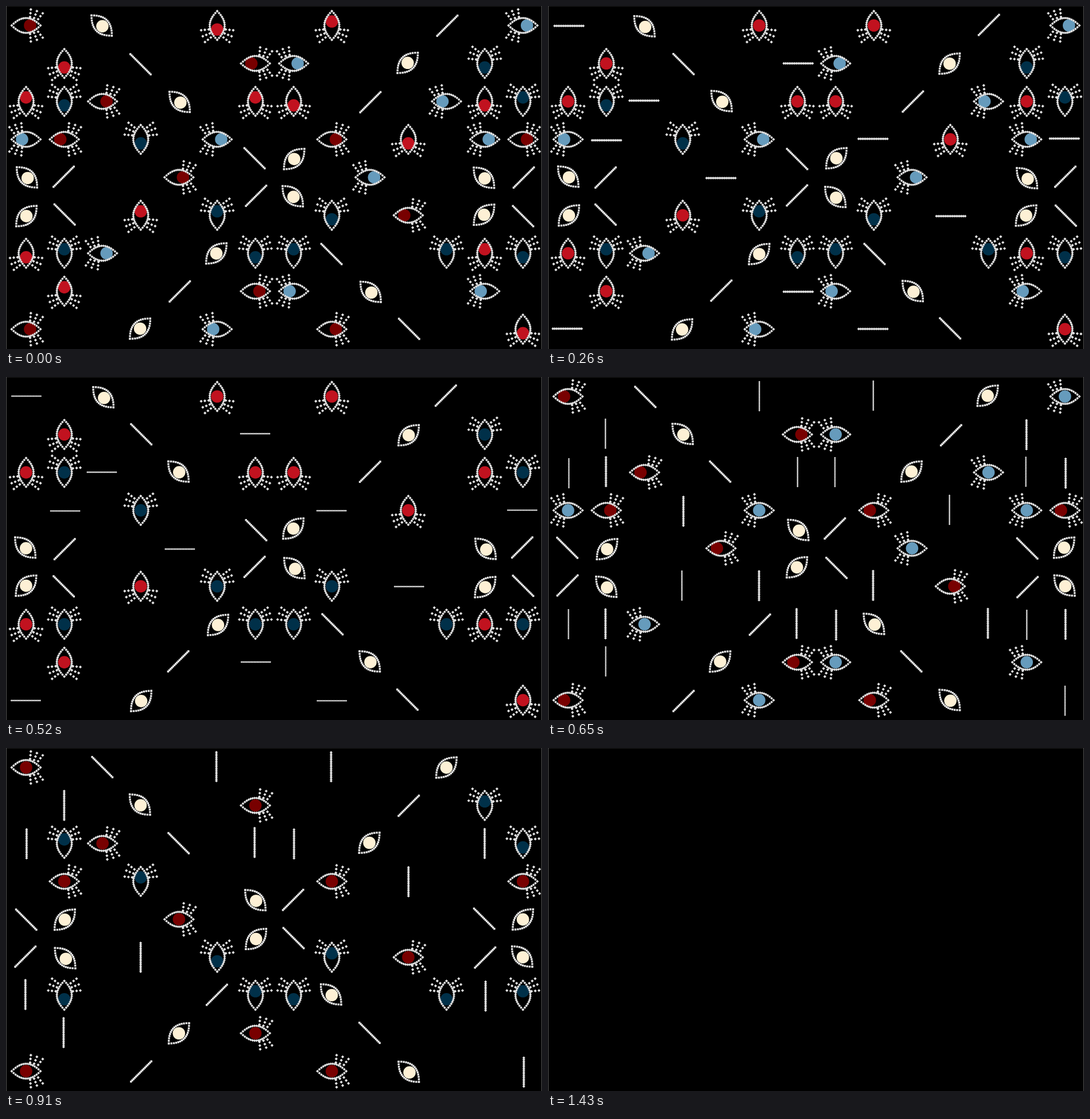
Recreate the animation shown at these times as an HTML page with a canvas. Size 934 by 599 pixels, loop 1560 ms.

```html
<!DOCTYPE html>
<html lang="en">
<head>
<meta charset="utf-8">
<title>Blinking eyes</title>
<style>
html, body { margin: 0; width: 100%; height: 100%; overflow: hidden; background: #000; }
canvas { display: block; }
</style>
</head>
<body>
<canvas id="stage" width="934" height="599"></canvas>
<script>
const ctx = document.getElementById('stage').getContext('2d');
const STEP = 130, STEPS = 12;
const HALF = 25, BULGE = 13, LOOK = 7;
const WHITE = '#e4e4e4', CREAM = '#fdf0d5';
const TURN = Math.PI / 4;

// One letter per eye; lower case m, l, r, n first look left or up
const layout = [
  'M.a..R..r..c.L',
  '.R.d..mL..b.N.',
  'rNM.a.rR.c.lRn',
  'lm.N.LdbM.R.LM',
  'ac..M....L..ac',
  'bd.r.ncaN.m.bd',
  'RnL..bNnd..nrN',
  '.r..c.Ml.a..l.',
  'M..b.l..M.d..R'
];

// Blink per step: o open, = shut, - shut and thin, . hidden
const EARLY = 'ooooo=====..', LATE = '=====oooooo.';
const kinds = {
  M: { color: '#780000', turn: 0, lash: true, blink: 'oo==-oooo...', gaze: f => f < 2 ? 1 : Math.min(0, (f - 7) / 2) },
  L: { color: '#669bbc', turn: 4, lash: true, blink: 'oooo.oo.....', gaze: f => f < 4 ? 1 : 0 },
  R: { color: '#c1121f', turn: 2, lash: true, blink: 'ooooo--==...', gaze: f => Math.max(0, 1 - f / 2) },
  N: { color: '#003049', turn: -2, lash: true, blink: 'ooooo==oo=..', gaze: f => Math.sign(4 - f) },
  A: { color: CREAM, turn: 1, blink: EARLY, gaze: () => 0.25 },
  B: { color: CREAM, turn: -1, blink: EARLY, gaze: () => 0 },
  C: { color: CREAM, turn: -1, blink: LATE, gaze: () => 0 },
  D: { color: CREAM, turn: 1, blink: LATE, gaze: () => 0.25 }
};

function makeEye(letter, col, row) {
  const name = letter.toUpperCase();
  // The middle pair of columns closes up towards the centre
  const squeeze = (col === 6 || col === 7) && Math.abs(row - 4) === 1 ? 0.5 : 1;
  return {
    kind: kinds[name],
    sign: kinds[name].lash && letter !== name ? -1 : 1,
    x: 35 + 66.6 * col,
    y: 34 + 66.3 * (4 + (row - 4) * squeeze),
    phase: col * 2.4 + row * 5.1
  };
}

const eyes = layout.flatMap((cells, row) =>
  [...cells].flatMap((letter, col) => letter === '.' ? [] : [makeEye(letter, col, row)]));

function bead(x, y, r = 2.4) {
  ctx.beginPath();
  ctx.moveTo(x - r, y);
  ctx.lineTo(x, y - r);
  ctx.lineTo(x + r, y);
  ctx.lineTo(x, y + r);
  ctx.fill();
}

function drawLine(thin) {
  const gap = thin ? 2.5 : 3.125;
  for (let x = -HALF; x <= HALF; x += gap) bead(x, 0, thin ? 1.7 : 2.5);
}

function drawOutline() {
  const n = 15;
  for (let i = 0; i <= n; i++) {
    const u = 2 * i / n - 1, h = BULGE * (1 - u * u);
    bead(u * HALF, -h);
    bead(u * HALF, h);
  }
}

// Three lashes fan out on each side of one end
function drawLashes() {
  for (const side of [-1, 1]) {
    for (let i = 0; i < 3; i++) {
      const lean = 0.1 + 0.28 * i;
      for (let d = 0; d <= 13; d += 6.5) {
        bead(7 + 7 * i + d * Math.sin(lean), side * (15 - 2 * i + d * Math.cos(lean)), 2.6);
      }
    }
  }
}

function drawPupil(color, angle, shift) {
  ctx.fillStyle = color;
  ctx.beginPath();
  ctx.arc(shift * Math.abs(Math.cos(angle)), shift * Math.abs(Math.sin(angle)), 10.8, 0, Math.PI * 2);
  ctx.fill();
}

function drawEye({ kind, sign, x, y, phase }, f) {
  const state = kind.blink[f], open = state === 'o';
  if (state === '.') return;
  const angle = kind.turn * TURN;
  const drift = open && kind.lash ? 0 : 1.5;
  ctx.save();
  ctx.translate(x + drift * Math.sin(f * 0.7 + phase), y + drift * Math.cos(f * 0.5 + phase));
  if (open) drawPupil(kind.color, angle, sign * LOOK * kind.gaze(f));
  ctx.rotate(angle);
  ctx.fillStyle = WHITE;
  if (open) {
    drawOutline();
    if (kind.lash) drawLashes();
  } else {
    drawLine(state === '-');
  }
  ctx.restore();
}

function draw(f) {
  ctx.fillStyle = '#000';
  ctx.fillRect(0, 0, 934, 599);
  for (const eye of eyes) drawEye(eye, f);
  ctx.fillStyle = '#1a1a1a';
  ctx.fillRect(0, 0, 934, 1);
  ctx.fillStyle = '#555';
  ctx.fillRect(0, 0, 1, 599);
  ctx.fillRect(933, 0, 1, 599);
}

function tick() {
  draw(Math.floor(performance.now() / STEP) % STEPS);
  requestAnimationFrame(tick);
}
tick();
</script>
</body>
</html>
```
